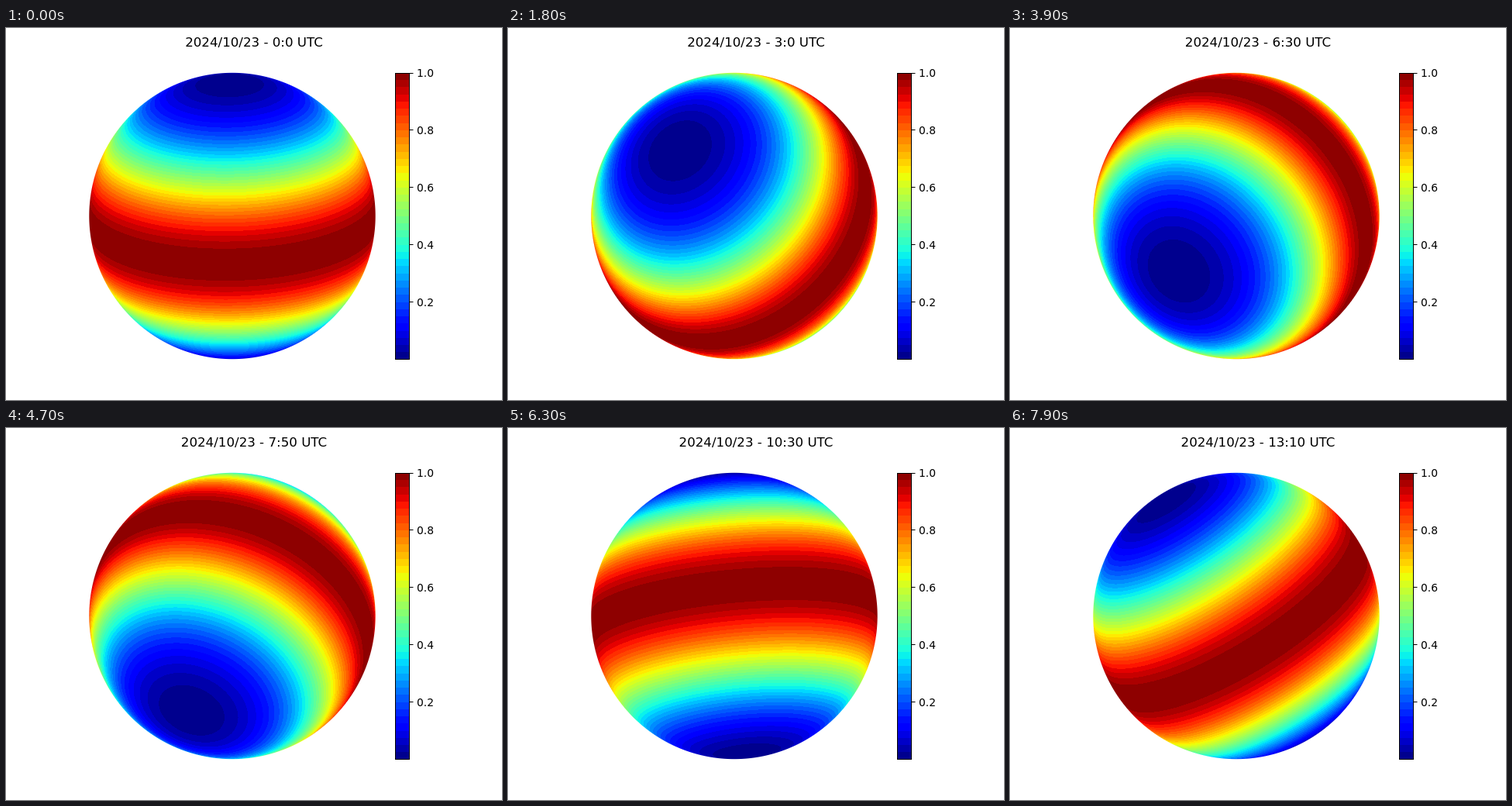
An HTML page with a canvas that plays this animation: 640 px wide and 480 px high, repeating every 8000 ms.

```html
<!DOCTYPE html>
<html>
<head>
<meta charset="utf-8">
<style>
  html, body { margin: 0; width: 100%; height: 100%; overflow: hidden; background: #fff; }
  canvas, svg { position: absolute; left: 0; top: 0; }
  text { font-family: "DejaVu Sans", Verdana, sans-serif; font-size: 13.89px; }
  #title { font-size: 16.67px; text-anchor: middle; }
</style>
</head>
<body>
<canvas id="globe" width="640" height="480"></canvas>
<svg id="chart" width="640" height="480">
  <text id="title" x="320" y="24"></text>
</svg>
<script>
const STEP_MS = 100, STEPS = 80, BANDS = 40;
const CX = 292, CY = 242.5, R = 184.7;
const BAR = { x: 502.5, y: 58, w: 18, h: 369.5 };
const rad = d => d * Math.PI / 180;
const clamp = v => Math.min(1, Math.max(0, v));

// Jet colour map
function jet(v) {
  const r = v < 0.89 ? clamp((v - 0.35) / 0.31) : 1 - 0.5 * (v - 0.89) / 0.11;
  const g = Math.min(clamp((v - 0.125) / 0.25), clamp((0.91 - v) / 0.27));
  const b = v < 0.11 ? 0.5 + 0.5 * v / 0.11 : clamp((0.65 - v) / 0.31);
  return [r, g, b].map(c => Math.round(c * 255));
}
const palette = Array.from({ length: BANDS }, (_, i) => jet((i + 0.5) / BANDS));

// Field strength from the squared cosine of the latitude
const field = c2 => c2 * (0.41 + 0.41 * c2 + 0.18 * c2 * c2);

// The pole circles a fixed axis lying in the horizontal plane
const AXIS = rad(50.5), ALONG = 0.203, ACROSS = Math.sqrt(1 - ALONG * ALONG);
function poleAt(step) {
  const phi = rad(16.4 + 2.5 * step), u = ACROSS * Math.sin(phi);
  return [
    ALONG * Math.sin(AXIS) - u * Math.cos(AXIS),
    ACROSS * Math.cos(phi),
    ALONG * Math.cos(AXIS) + u * Math.sin(AXIS)
  ];
}

const ctx = document.getElementById('globe').getContext('2d');
const X0 = 106, Y0 = 57, SIZE = 372;
const image = ctx.createImageData(SIZE, SIZE);

function drawGlobe(step) {
  const [px, py, pz] = poleAt(step), data = image.data;
  for (let j = 0, k = 0; j < SIZE; j++) {
    const y = (CY - Y0 - j - 0.5) / R;
    for (let i = 0; i < SIZE; i++, k += 4) {
      const x = (X0 + i + 0.5 - CX) / R, d2 = x * x + y * y;
      const alpha = clamp((1 - Math.sqrt(d2)) * R + 0.5);
      data[k + 3] = alpha * 255;
      if (!alpha) continue;
      const s = x * px + y * py + Math.sqrt(Math.max(0, 1 - d2)) * pz;
      const band = Math.floor(clamp(field(1 - s * s)) * BANDS);
      const [r, g, b] = palette[Math.min(BANDS - 1, band)];
      data[k] = r;
      data[k + 1] = g;
      data[k + 2] = b;
    }
  }
  ctx.putImageData(image, X0, Y0);
}

function add(tag, attrs, label = '') {
  const el = document.createElementNS('http://www.w3.org/2000/svg', tag);
  for (const name in attrs) el.setAttribute(name, attrs[name]);
  el.textContent = label;
  document.getElementById('chart').append(el);
}

function drawBar() {
  const cell = BAR.h / BANDS, right = BAR.x + BAR.w;
  palette.forEach((rgb, i) => add('rect', {
    x: BAR.x, y: BAR.y + BAR.h - (i + 1) * cell, width: BAR.w, height: cell,
    fill: `rgb(${rgb})`, 'shape-rendering': 'crispEdges'
  }));
  add('rect', { x: BAR.x, y: 58.5, width: BAR.w, height: 369, fill: 'none', stroke: '#000' });
  for (let i = 1; i <= 5; i++) {
    const y = BAR.y + BAR.h * (1 - i / 5);
    add('path', { d: `M${right} ${Math.floor(y) + 0.5}h5`, stroke: '#000' });
    add('text', { x: 530, y: Math.round(y + 5) }, (i / 5).toFixed(1));
  }
}

const title = document.getElementById('title');
let shown = -1;
const start = performance.now();

function tick() {
  const step = Math.floor((performance.now() - start) / STEP_MS) % STEPS;
  if (step !== shown) {
    shown = step;
    drawGlobe(step);
    title.textContent = `2024/10/23 - ${Math.floor(step / 6)}:${step % 6 * 10} UTC`;
  }
  requestAnimationFrame(tick);
}

drawBar();
tick();
</script>
</body>
</html>
```
